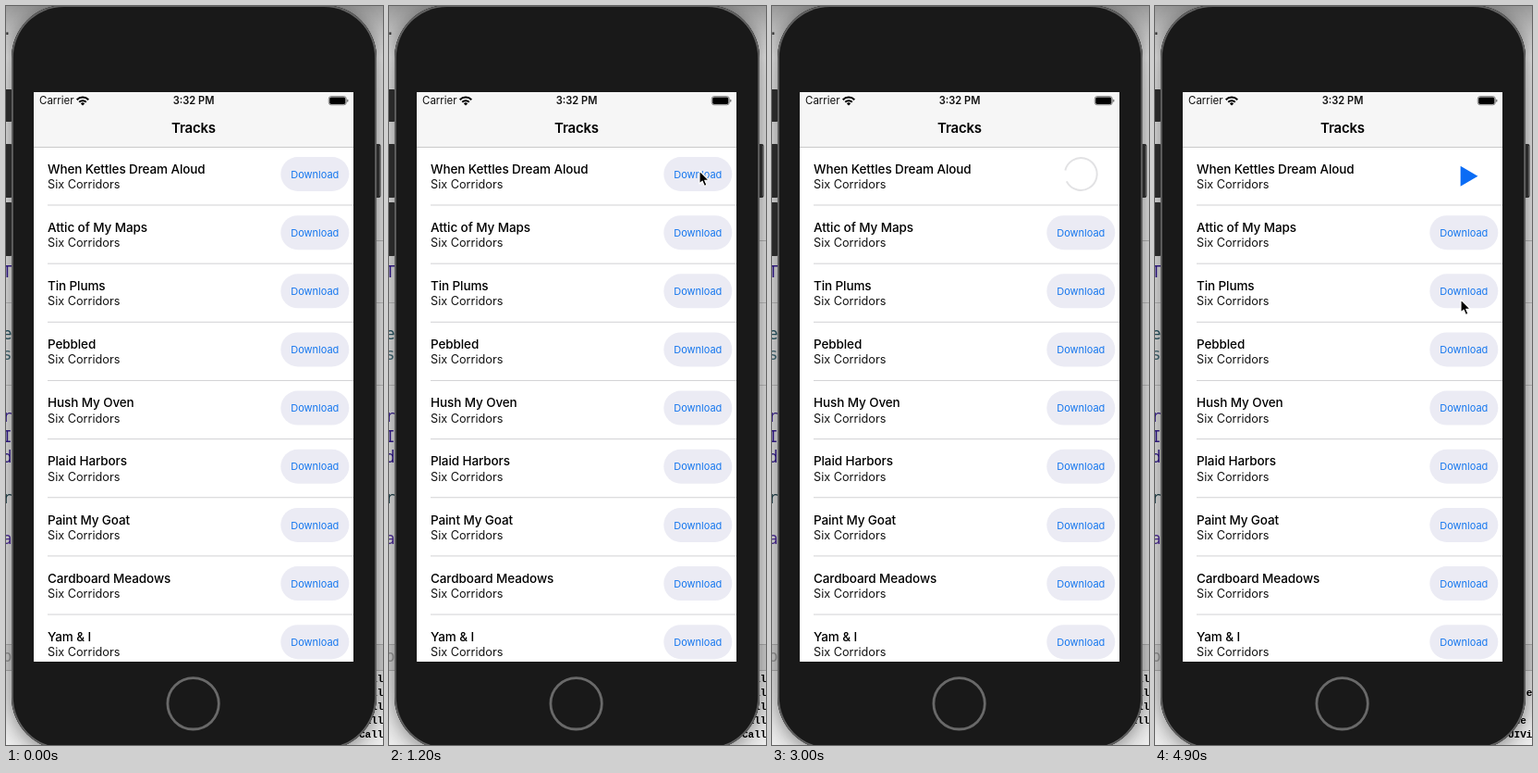
These frames come from a looping animation (408x798 px, 5 s). An HTML page with a canvas:

```html
<!DOCTYPE html>
<html lang="en">
<head>
<meta charset="utf-8">
<title>Tracks</title>
<style>
  html, body { margin: 0; width: 100%; height: 100%; overflow: hidden; background: #fff; }
  canvas { display: block; width: 408px; height: 798px; }
</style>
</head>
<body>
<canvas id="stage" width="408" height="798"></canvas>
<script>
const ctx = document.getElementById('stage').getContext('2d');
const W = 408, H = 798, LOOP = 5000, STEP = 100;
const UI = 'Inter, sans-serif';
const CODE = '"DejaVu Sans Mono", monospace', LOG = '"Liberation Mono", monospace';
const BLUE = '#0a6cf5', BODY = '#191919', RING = '#e2e2e4';
const ROW = 63.15, CX = 334.3, CY = 181.5, R = 17.4;
const ARTIST = 'Six Corridors';
const TRACKS = ['When Kettles Dream Aloud', 'Attic of My Maps', 'Tin Plums', 'Pebbled',
  'Hush My Oven', 'Plaid Harbors', 'Paint My Goat', 'Cardboard Meadows', 'Yam & I'];

const lerp = (a, b, k) => a + (b - a) * k;
const clamp = k => Math.max(0, Math.min(1, k));
const rad = deg => deg * Math.PI / 180;

function rect(x, y, w, h, color) {
  ctx.fillStyle = color;
  ctx.fillRect(x, y, w, h);
}

function round(x, y, w, h, r, color) {
  ctx.beginPath();
  ctx.roundRect(x, y, w, h, r);
  ctx.fillStyle = color;
  ctx.fill();
}

function text(str, x, y, font, color, align = 'left', spacing = 0) {
  ctx.font = font;
  ctx.fillStyle = color;
  ctx.textAlign = align;
  ctx.letterSpacing = spacing + 'px';
  ctx.fillText(str, x, y);
}

function arc(x, y, r, from, to, color, width) {
  ctx.beginPath();
  ctx.arc(x, y, r, rad(from), rad(to));
  ctx.strokeStyle = color;
  ctx.lineWidth = width;
  ctx.stroke();
}

function poly(points, color) {
  ctx.beginPath();
  points.forEach(([x, y]) => ctx.lineTo(x, y));
  ctx.closePath();
  ctx.fillStyle = color;
  ctx.fill();
}

function backdrop(t) {
  rect(0, 0, W, H, '#fff');
  for (const y of [320, 409]) rect(0, y, W, 1, '#d4d4d4');
  rect(400, 253, 8, 1, '#c8c8c8');
  rect(0, 689, W, 28, '#ececec');
  rect(0, 689, W, 1, '#c4c4c4');
  rect(0, 717, W, 1, '#c4c4c4');

  const code = [['.', 31, '#444'], ['T', 293, '#3b1fa0'],
    ['e', 360, '#2c6070'], ['s', 382, '#4a7684'], ['r', 449, '#3b1fa0'], ['I', 471, '#3b1fa0'],
    ['d', 493, '#3b1fa0'], ['r', 537, '#1d4650'], ['a', 581, '#5a35b0'], ['o', 708, '#aaa']];
  for (const [c, y, color] of code) text(c, 6.5, y, '17px ' + CODE, color, 'right');

  const log = t >= 4000 ? ['', '  re', '', ' ne', 'UIVi']
    : Array(t < 1500 ? 5 : 4).fill('Call');
  log.forEach((s, i) => text(s, 382, 729.5 + i * 15.2, 'bold 11px ' + LOG, '#000'));

  const shade = ctx.createLinearGradient(0, 0, 0, 55);
  shade.addColorStop(0, 'rgba(0,0,0,.36)');
  shade.addColorStop(1, 'rgba(0,0,0,0)');
  rect(0, 0, W, 55, shade);
}

function shadow(blur, alpha) {
  ctx.save();
  ctx.shadowColor = `rgba(0,0,0,${alpha})`;
  ctx.shadowBlur = blur;
  ctx.shadowOffsetY = 3;
  round(6, -1, 395, 804, 57, BODY);
  ctx.restore();
}

function phone(t) {
  const wide = t >= 1600 && t < 2000;
  shadow(60, 0.42);
  shadow(16, 0.26);

  for (const [y, h] of [[90, 35], [149, 58], [212, 58]]) round(-3, y, 10, h, 2, '#292929');
  round(399, 149, wide ? 12 : 6.5, 58, 2, '#292929');
  if (!wide) rect(404, 151, 1, 54, '#555');

  round(6, -1, 395, 804, 57, '#626262');
  round(7.8, 1, 391.4, 800, 55, BODY);
  arc(202.6, 753.3, 27.7, 0, 360, '#696969', 2.8);
}

function statusBar() {
  rect(30, 93, 346, 59, '#f6f6f6');
  rect(30, 152, 346, 1, '#cacaca');
  text('Carrier', 36, 106.3, '11.5px ' + UI, '#111');
  text('3:32 PM', 203, 106.3, '600 11.1px ' + UI, '#111', 'center');
  text('Tracks', 203, 137, '600 15px ' + UI, '#000', 'center', -0.2);

  ctx.beginPath();
  ctx.moveTo(83, 107.5);
  ctx.arc(83, 107.5, 3, rad(-135), rad(-45));
  ctx.fillStyle = '#000';
  ctx.fill();
  arc(83, 107.5, 5.3, -135, -45, '#000', 2);
  arc(83, 107.5, 8.9, -135, -45, '#000', 2);

  ctx.beginPath();
  ctx.roundRect(349.3, 97.6, 19, 9.2, 2.6);
  ctx.strokeStyle = '#777';
  ctx.lineWidth = 0.9;
  ctx.stroke();
  round(350.2, 98.5, 17.2, 7.4, 1.6, '#000');
  round(369, 100.8, 1.4, 3, 0.7, '#777');
}

function pill(y, shrink = 0) {
  const w = lerp(74, 37, shrink);
  ctx.globalAlpha = 1 - shrink * 0.7;
  round(CX - w / 2, y - 18.5, w, 37, 18.5, '#ebebf4');
  ctx.globalAlpha = clamp(1 - shrink * 2);
  text('Download', CX, y + 4.1, '11px ' + UI, '#1677ee', 'center');
  ctx.globalAlpha = 1;
}

// Button states: start, pending, downloading, ready.
function firstButton(t) {
  if (t < 1600) {
    pill(CY, clamp((t - 1300) / 300));
  } else if (t < 3400) {
    const gap = -43 + (t - 1800) * 0.18;
    arc(CX, CY, R, gap + 20, gap + 340, RING, 2);
  } else if (t < 4100) {
    arc(CX, CY, R, 0, 360, '#e9e9eb', 2);
    const done = clamp((t - 3600) / 400);
    if (done > 0) arc(CX, CY, R, -90, -90 + 360 * done, BLUE, 2);
    round(328.6, 175.8, 11.6, 11.6, 2.4, '#1467e0');
  } else {
    poly([[330.6, 172.8], [349.4, 183.8], [330.6, 194.8]], BLUE);
  }
}

function list(t) {
  TRACKS.forEach((name, i) => {
    const y = i * ROW;
    text(name, 45, 180.7 + y, '500 13.5px ' + UI, '#000', 'left', -0.1);
    text(ARTIST, 45, 197 + y, '12.7px ' + UI, '#111');
    rect(45, 214.5 + y, 331, 1, '#d2d2d4');
    if (i) pill(CY + y);
    else firstButton(t);
  });
}

function pointerAt(t) {
  if (t >= 300 && t < 1500) {
    const k = clamp((t - 300) / 300), drift = clamp((t - 700) / 400);
    const ease = 1 - (1 - k) ** 2;
    return [lerp(345, 334.5, ease) + drift, lerp(225, 174.5, ease) + 3 * drift];
  }
  if (t >= 4900) return [330.5, 316.5];
  if (t >= 4700) return [329.5, 334.3];
  if (t >= 4600) return [351.5, 334.3];
  return null;
}

function pointer(t) {
  const at = pointerAt(t);
  if (!at) return;
  const shape = [[0, 0], [0, 14], [3.1, 11.2], [5.4, 16.4], [7.9, 15.3], [5.7, 10.3], [10, 10]];
  ctx.save();
  ctx.translate(at[0] + 0.5, at[1] + 0.5);
  poly(shape, '#000');
  ctx.strokeStyle = '#fff';
  ctx.lineWidth = 1.1;
  ctx.lineJoin = 'round';
  ctx.stroke();
  ctx.restore();
}

function draw(t) {
  backdrop(t);
  phone(t);
  ctx.save();
  ctx.beginPath();
  ctx.rect(30, 93, 346, 615);
  ctx.clip();
  rect(30, 93, 346, 615, '#fff');
  statusBar();
  list(t);
  pointer(t);
  ctx.restore();
}

const start = performance.now();
function tick() {
  const t = (performance.now() - start) % LOOP;
  draw(Math.floor(t / STEP) * STEP);
  requestAnimationFrame(tick);
}
tick();
</script>
</body>
</html>
```
